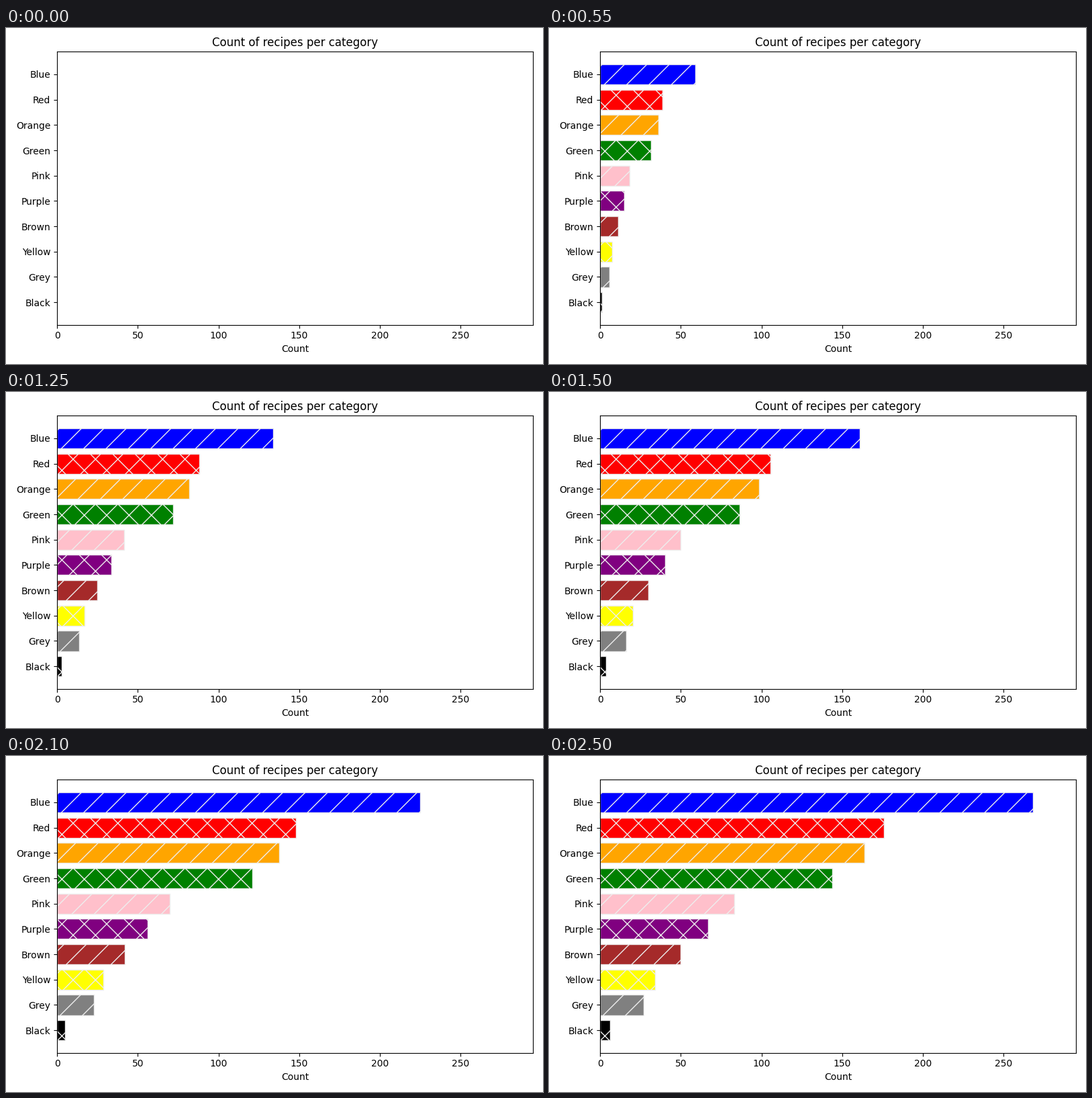
A matplotlib script for the animation above (2550 ms loop, 800 by 500 pixels).

```python
import matplotlib.pyplot as plt
from matplotlib.animation import FuncAnimation

COUNTS = {
    "Blue": 268, "Red": 176, "Orange": 164, "Green": 144, "Pink": 83,
    "Purple": 67, "Brown": 50, "Yellow": 34, "Grey": 27, "Black": 6,
}
FRAMES = 51
INTERVAL = 50

plt.rcParams["font.family"] = "DejaVu Sans"

names = list(COUNTS)
totals = list(COUNTS.values())

fig, ax = plt.subplots(figsize=(8, 5), dpi=100)
bars = ax.barh(names, totals, color=[name.lower() for name in names],
               edgecolor="#eeeeee", hatch=["/", "x"] * 5)
ax.set_xlim(0, max(totals) * 1.1)
ax.invert_yaxis()
ax.set_title("Count of recipes per category")
ax.set_xlabel("Count")
fig.tight_layout()
fig.subplots_adjust(top=0.9292)


def update(frame):
    """Grow every bar linearly towards its total."""
    progress = frame / (FRAMES - 1)
    for bar, total in zip(bars, totals):
        bar.set_width(total * progress)
    return list(bars)


anim = FuncAnimation(fig, update, frames=FRAMES, interval=INTERVAL,
                     repeat=True, repeat_delay=0, blit=False)
plt.show()
```
